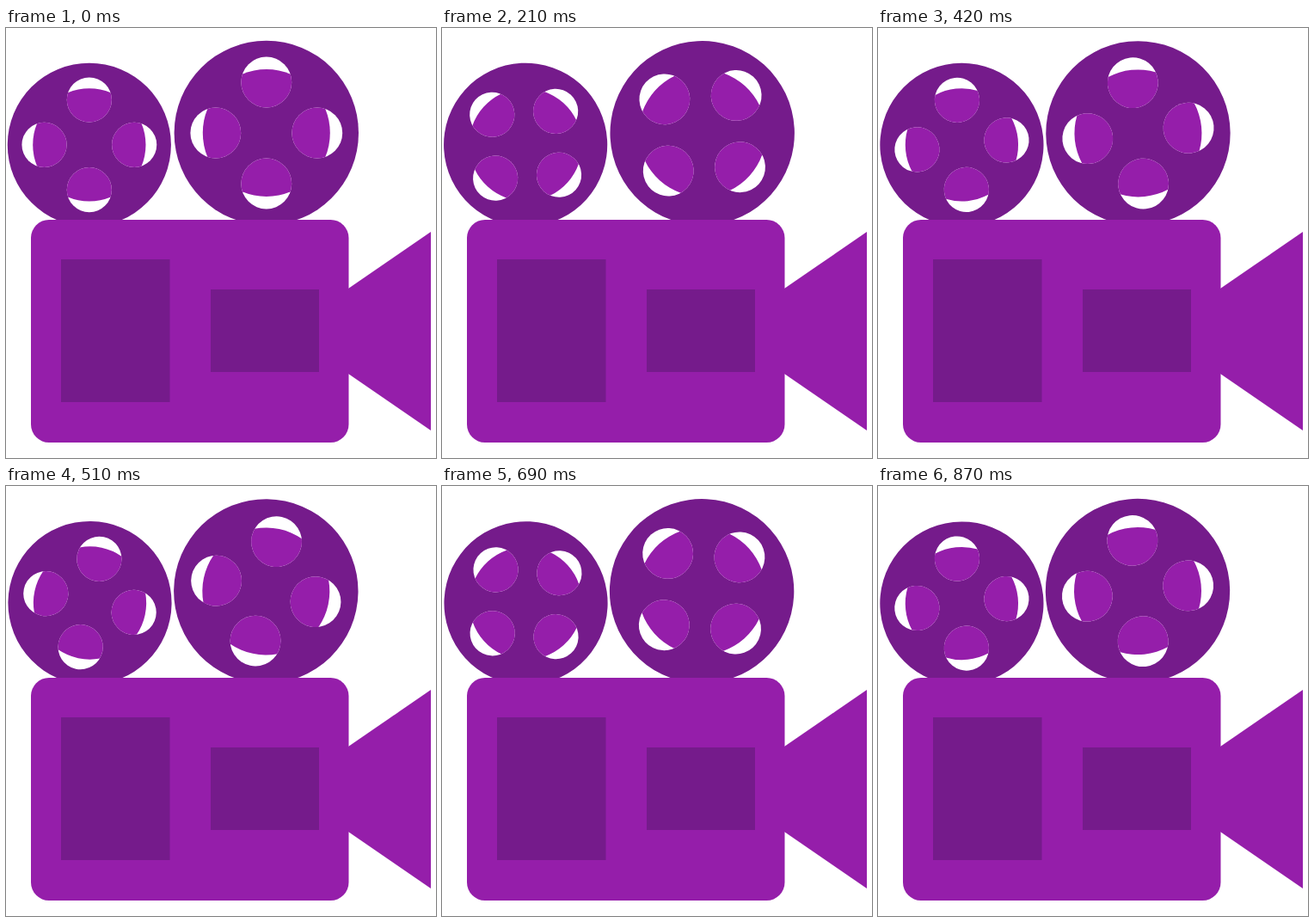
Animation of 500x500 px, one loop 930 ms. Source, as an HTML page:

```html
<!DOCTYPE html>
<html lang="en">
<head>
<meta charset="utf-8">
<title>Film camera</title>
<style>
  html, body { margin: 0; width: 100%; height: 100%; overflow: hidden; background: #fff; }
  svg { display: block; width: 100vw; height: 100vh; }
  .dark { fill: #751b8b; }
  .light { fill: #951eaa; }
</style>
</head>
<body>
<svg viewBox="0 0 500 500">
  <defs>
    <g id="holes">
      <circle cy="-59" r="29.4"/>
      <circle cx="59" r="29.4"/>
      <circle cy="59" r="29.4"/>
      <circle cx="-59" r="29.4"/>
    </g>
    <clipPath id="hub"><circle r="74"/></clipPath>
    <g id="reel">
      <circle class="dark" r="107.2"/>
      <use href="#holes" fill="#fff"/>
      <g clip-path="url(#hub)"><use href="#holes" class="light"/></g>
    </g>
  </defs>
  <use href="#reel" class="reel" data-place="translate(97.1 136.2) scale(.887)" data-offset="translate(-.3 -.4)"/>
  <use href="#reel" class="reel" data-place="translate(302.4 122)" data-offset="translate(.4 0)"/>
  <g class="light">
    <rect x="29" y="223" width="369.5" height="259" rx="21"/>
    <path d="M398 303 494 237V468L398 402Z"/>
  </g>
  <g class="dark">
    <rect x="64" y="269" width="126.5" height="166"/>
    <rect x="238" y="304" width="126" height="96"/>
  </g>
</svg>
<script>
  const LOOP = 930, STEP = 30, LAST_STEP = 29, DEGREES = 6;
  const reels = document.querySelectorAll('.reel');

  function draw() {
    const step = Math.min(LAST_STEP, Math.floor(performance.now() % LOOP / STEP));
    for (const reel of reels) {
      const { place, offset } = reel.dataset;
      reel.setAttribute('transform', `${place} rotate(${step * DEGREES}) ${offset}`);
    }
    requestAnimationFrame(draw);
  }
  draw();
</script>
</body>
</html>
```
